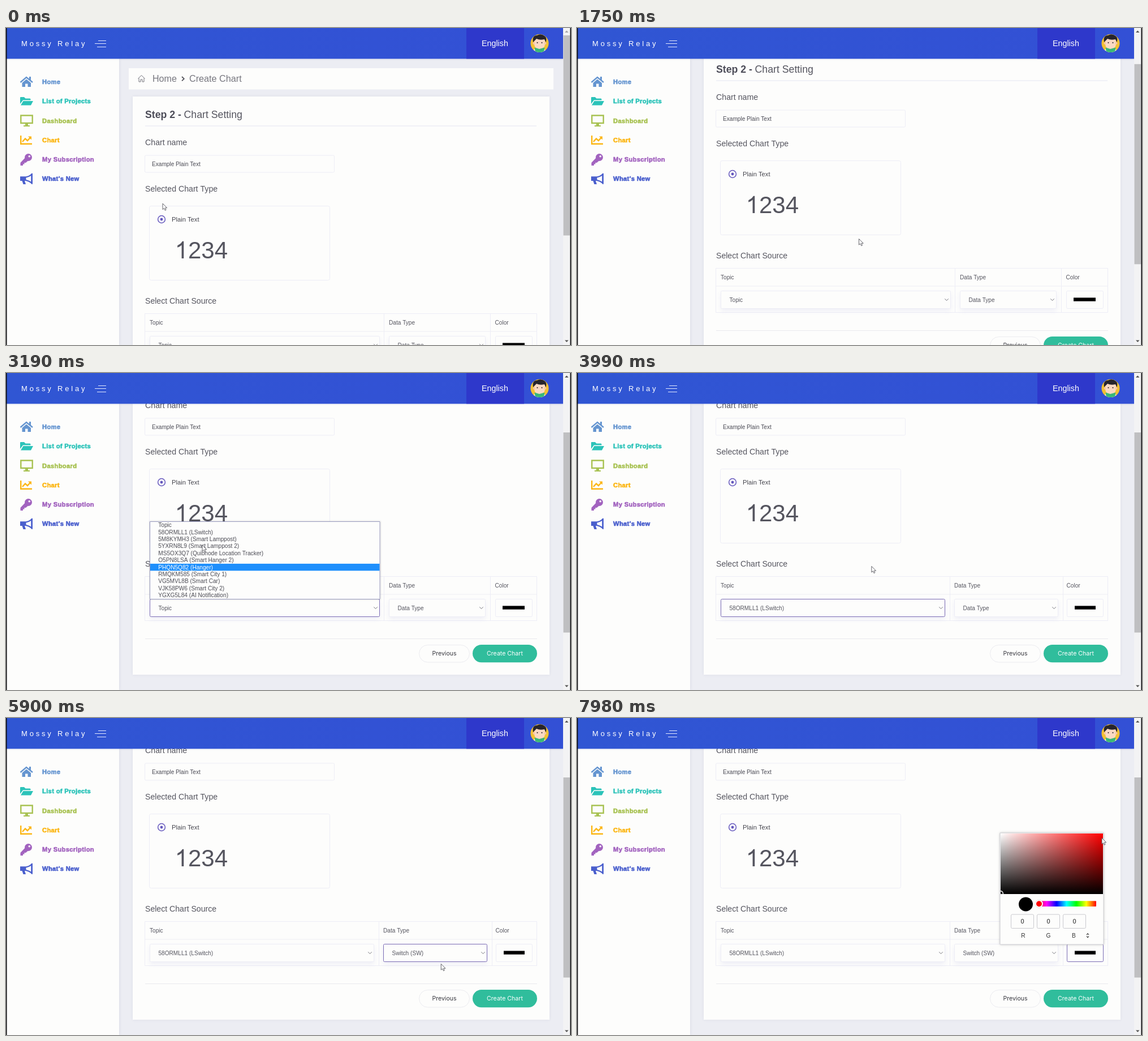
An HTML page with a canvas for the animation above (8000 ms loop, 999x560 px).

```html
<!DOCTYPE html>
<html lang="en">
<head>
<meta charset="utf-8">
<title>Chart setting</title>
<style>
html, body { margin: 0; width: 999px; height: 560px; overflow: hidden; background: #ecedf3; }
canvas { display: block; }
</style>
</head>
<body>
<canvas id="stage" width="999" height="560"></canvas>
<script>
const ctx = document.getElementById('stage').getContext('2d');
const LOOP = 8000, STEP = 159.6, SCROLL = 145;
const SANS = '"Liberation Sans", Arial, sans-serif';
const ROUND = 'Inter, "Open Sans", sans-serif';
const INK = '#55555f', LINE = '#ededf6', WHITE = '#fdfdfc', FOCUS = '#7a6bb5';

// Moments when the page reacts
const TOPIC_OPEN = 2700, TOPIC_SET = 3500, TYPE_OPEN = 4620, TYPE_SET = 5560,
      COLOR_FOCUS = 6690, PANEL = 6840, PICKER = 7000;

const TOPICS = ['Topic', '58ORMLL1 (LSwitch)', '5M8KYMH3 (Smart Lamppost)', '5YXRN8L9 (Smart Lamppost 2)',
  'MS5OX3Q7 (Quibnode Location Tracker)', 'O5PN8LSA (Smart Hanger 2)', 'PHQN5Q82 (Hanger)',
  'RMQKM585 (Smart City 1)', 'VG5MVL8B (Smart Car)', 'VJK58PW6 (Smart City 2)', 'YGXG5L84 (AI Notification)'];
const TYPES = ['Data Type', 'Switch (SW)'];

// time, x, y of the pointer tip
const PATH = [
  [0, 277, 310], [160, 277, 310], [1120, 498.5, 372.5], [2150, 498.5, 372.5], [2620, 385, 413], [2780, 372, 412],
  [3032, 350, 343], [3192, 347, 304], [3352, 344, 282], [3560, 344, 281], [4480, 736, 415],
  [5000, 736, 415], [5270, 712, 447], [5580, 712, 448], [6400, 877, 409], [6900, 877, 409], [7800, 928, 212]
];

const clamp = v => Math.max(0, Math.min(1, v));
const smooth = v => { v = clamp(v); return v * v * (3 - 2 * v); };

function pointer(t) {
  let i = 0;
  while (i < PATH.length - 2 && t >= PATH[i + 1][0]) i++;
  const [t0, x0, y0] = PATH[i], [t1, x1, y1] = PATH[i + 1];
  const k = t1 - t0 > 400 ? smooth((t - t0) / (t1 - t0)) : clamp((t - t0) / (t1 - t0));
  return [x0 + (x1 - x0) * k, y0 + (y1 - y0) * k];
}

function text(s, x, mid, size, color = INK, { weight = '', family = SANS, align = 'left', gap = 0 } = {}) {
  ctx.font = `${weight} ${size}px ${family}`;
  ctx.textAlign = align;
  ctx.letterSpacing = gap + 'px';
  ctx.fillStyle = color;
  ctx.fillText(s, x, mid + size * 0.36);
  ctx.letterSpacing = '0px';
}

function rect(x, y, w, h, color) {
  ctx.fillStyle = color;
  ctx.fillRect(x, y, w, h);
}

// A stroked box keeps its outline inside the given bounds
function box(x, y, w, h, r, fill, stroke, shadow) {
  const inset = stroke ? 0.5 : 0;
  ctx.save();
  ctx.beginPath();
  ctx.roundRect(x + inset, y + inset, w - 2 * inset, h - 2 * inset, r);
  if (shadow) {
    ctx.shadowColor = shadow;
    ctx.shadowBlur = 8;
    ctx.shadowOffsetY = 4;
  }
  if (fill) { ctx.fillStyle = fill; ctx.fill(); }
  ctx.shadowColor = 'transparent';
  if (stroke) { ctx.strokeStyle = stroke; ctx.lineWidth = 1; ctx.stroke(); }
  ctx.restore();
}

function circle(x, y, r, fill, stroke, width = 1) {
  ctx.beginPath();
  ctx.arc(x, y, r, 0, 7);
  if (fill) { ctx.fillStyle = fill; ctx.fill(); }
  if (stroke) { ctx.strokeStyle = stroke; ctx.lineWidth = width; ctx.stroke(); }
}

function shape(d, fill, stroke, width = 1) {
  const p = new Path2D(d);
  if (fill) { ctx.fillStyle = fill; ctx.fill(p); }
  if (stroke) { ctx.strokeStyle = stroke; ctx.lineWidth = width; ctx.stroke(p); }
}

function header() {
  ctx.save();
  ctx.shadowColor = 'rgba(50,60,130,.18)';
  ctx.shadowBlur = 4;
  const g = ctx.createLinearGradient(0, 0, 985, 0);
  g.addColorStop(0, '#3056d3');
  g.addColorStop(1, '#3350d5');
  rect(0, 0, 985, 54.4, g);
  ctx.restore();
  rect(814, 0, 102, 54.4, '#2e38cb');
  text('Mossy Relay', 27, 27.5, 13, '#fff', { gap: 3.8 });
  shape('M163 22.5H177M157 27.5H177M161 33.5H177', null, '#e3e9ff', 1.2);
  text('English', 841, 27, 14.3, '#fff');
  avatar();
}

function avatar() {
  ctx.save();
  ctx.beginPath();
  ctx.arc(943.5, 27, 16, 0, 7);
  ctx.clip();
  rect(927, 10, 33, 34, '#f3c132');
  shape('M931 44Q932 35 943 35Q954 35 956 44Z', '#f7f3e8');
  shape('M934 19H953V29Q952 37 943.5 37Q935 37 934 29Z', '#fbd9c3');
  shape('M934.5 34.5L943 37L952.5 34.5L951 43H936Z', '#38b878');
  circle(933.5, 27, 2, '#f6c6ac');
  circle(953.5, 27, 2, '#f6c6ac');
  shape('M932 25Q930 13 939 13Q946 9 952 14Q957 17 954.5 25L952 20Q944 22 938 19Z', '#26242b');
  circle(939.5, 26, 1.1, '#33292b');
  circle(947.5, 26, 1.1, '#33292b');
  ctx.restore();
}

function sidebar() {
  ctx.save();
  ctx.shadowColor = 'rgba(90,95,130,.16)';
  ctx.shadowBlur = 5;
  rect(0, 54, 200, 506, WHITE);
  ctx.restore();
  const items = [['Home', '#6595d0'], ['List of Projects', '#2cc3b9'], ['Dashboard', '#a8c252'],
    ['Chart', '#fcb614'], ['My Subscription', '#a263bf'], ["What's New", '#4a5fcd']];
  items.forEach(([label, color], i) => {
    const y = 95 + i * 34.25;
    text(label, 64, y, 11.2, color, { weight: 'bold', gap: 0.33 });
    ctx.strokeStyle = color;
    ctx.lineWidth = 0.6;
    ctx.letterSpacing = '0.33px';
    ctx.strokeText(label, 64, y + 11.2 * 0.36);
    ctx.letterSpacing = '0px';
  });
  const [home, folder, screen, chart, key, horn] = items.map(i => i[1]);
  shape('M25.5 96L36 87L47 96', null, home, 2.4);
  shape('M41 86H44V92H41ZM28.5 97L36 90.5L44 97V104H38.5V98.5H34V104H28.5Z', home);
  shape('M25 123Q25 122 26 122H32L34.5 124.5H42Q43.5 124.5 43.5 126V127.5H30L25 134Z', folder);
  shape('M30.5 129H48L44 136.5H26Z', folder);
  shape('M26.3 154.5H46.7V168H26.3Z', null, screen, 2.4);
  shape('M34 168H39V172H42V174H31V172H34Z', screen);
  shape('M26.2 190V204.8H46', null, chart, 2.4);
  shape('M29 201L34 195.5L38 199L43 193.5', null, chart, 2.4);
  shape('M39 191.5H45V197.5Z', chart);
  circle(39.5, 228.5, 6.5, key);
  shape('M34 229L39 234.5L35 238H32.5V240.5H30V243H25.5V238Z', key);
  circle(41.3, 226.7, 1.8, WHITE);
  shape('M26 263.5H35Q41 262.5 45.5 258.5V274Q41 270 35 269H26Z', null, horn, 2);
  shape('M25 262.5H35.5V270H33L35 276H30.5L28.5 270H25ZM44.5 257H47V275.5H44.5Z', horn);
}

function chevron(x, y) {
  shape(`M${x - 3.2} ${y - 1.7}L${x} ${y + 1.6}L${x + 3.2} ${y - 1.7}`, null, '#77777f', 1);
}

function select(x, right, y, label, focused) {
  box(x, y, right - x, 32, 2, WHITE, focused ? FOCUS : LINE, 'rgba(90,90,190,.09)');
  text(label, x + 15.5, y + 16, 10.1);
  chevron(right - 7.5, y + 16);
}

function content(t, shift) {
  ctx.save();
  ctx.translate(0, -shift);
  rect(217, 71, 751, 37.5, WHITE);
  shape('M233.5 89.5L239.5 83.5L245.5 89.5M235 88.5V95H238V91H241V95H244V88.5', null, '#76767e', 1);
  text('Home', 259, 89.5, 16.1, '#77777f');
  shape('M311 86L314.8 89.7L311 93.4', null, '#55555c', 1.8);
  text('Create Chart', 324, 89.5, 16.2, '#77777f');

  ctx.save();
  ctx.shadowColor = 'rgba(80,85,130,.1)';
  ctx.shadowBlur = 5;
  rect(224, 121, 737, 557, WHITE);
  ctx.restore();
  text('Step 2 -', 246, 152.5, 17.7, '#4c4c58', { weight: 'bold' });
  text('Chart Setting', 314.6, 152.5, 17.7);
  rect(246, 172.5, 692, 1, '#e3e5f3');
  text('Chart name', 246, 202, 14.2);
  box(245, 224.5, 336, 31, 2, WHITE, LINE);
  text('Example Plain Text', 258, 240, 10.1, '#4a4a54');
  text('Selected Chart Type', 246, 284, 14.15);
  box(253, 314, 320, 132, 3, WHITE, LINE);
  circle(275, 338, 6.4, null, '#6558bd', 1.5);
  circle(275, 338, 2.4, '#6558bd');
  text('Plain Text', 293, 337.5, 11.2, '#45454e');
  bigNumber(298.6, 407, 42);
  text('Select Chart Source', 246, 482, 14.1);
  table(t);

  rect(246, 614, 693, 1, '#e9e9ed');
  box(730, 625, 90, 31.5, 15.5, WHITE, '#ececf0');
  text('Previous', 775, 640.3, 10.5, '#34343c', { family: ROUND, align: 'center' });
  box(825, 625, 114, 31.2, 15.6, '#30bd9c');
  text('Create Chart', 882, 640.3, 10.6, '#fff', { family: ROUND, align: 'center' });
  ctx.restore();
}

// The leading digit is a plain stem with a flag and no foot
function bigNumber(x, y, s) {
  ctx.save();
  ctx.translate(x, y);
  ctx.scale(s, -s);
  shape('M.3726 0H.2847V.56Q.22 .495 .109 .457V.543Q.255 .61 .316 .7188H.3726Z', INK);
  ctx.restore();
  ctx.font = `${s}px ${SANS}`;
  ctx.textAlign = 'left';
  ctx.fillStyle = INK;
  ctx.fillText('234', x + s * 0.556, y);
}

function table(t) {
  const set = t >= TOPIC_SET;
  const colType = set ? 659 : 668, colColor = set ? 859 : 856;
  const typeX = set ? 667 : 677, colorX = set ? 866 : 865;
  box(245, 504, 694, 79, 0, null, LINE);
  rect(246, 535.5, 693, 1, LINE);
  rect(colType, 505, 1, 78, LINE);
  rect(colColor, 505, 1, 78, LINE);
  text('Topic', 254, 520, 10.1);
  text('Data Type', typeX, 520, 10.1);
  text('Color', colorX - 0.5, 520, 10.1);
  select(254, set ? 651 : 661, 544, set ? TOPICS[1] : TOPICS[0], t >= TOPIC_OPEN && t < TYPE_OPEN);
  select(typeX, set ? 851 : 848, 544, t >= TYPE_SET ? TYPES[1] : TYPES[0], t >= TYPE_OPEN && t < COLOR_FOCUS);
  box(colorX, 544, 931 - colorX, 32, 2, WHITE, t >= COLOR_FOCUS ? FOCUS : LINE);
  rect(set ? 880 : 878, 556.4, set ? 37 : 39, 6.3, '#000');
}

function list(items, x, y, w, h, hoverY) {
  const row = 12.4;
  const hit = Math.floor((hoverY - y - 0.5) / row);
  const on = hit >= 0 && hit < items.length ? hit : 0;
  ctx.save();
  ctx.shadowColor = 'rgba(0,0,0,.2)';
  ctx.shadowBlur = 3;
  rect(x, y, w, h, WHITE);
  ctx.restore();
  box(x, y, w, h, 0, null, '#9a9cc0');
  rect(x + 1, y + on * row + 0.5, w - 2, row, '#1e8ffc');
  items.forEach((s, i) => text(s, x + 15.2, y + 6.5 + i * row, 10.15, i === on ? '#fff' : '#4c4c55'));
}

function panel(t) {
  if (t < PICKER) {
    // only the frame has appeared, the page still shows inside it
    box(747, 202, 184.5, 198, 1, null, '#dadae0');
    box(746, 201, 186.5, 200, 2, null, '#ededf1');
    return;
  }
  ctx.save();
  ctx.shadowColor = 'rgba(0,0,0,.28)';
  ctx.shadowBlur = 4;
  rect(748, 203, 183, 197, WHITE);
  ctx.restore();
  box(747.5, 202.5, 184, 198, 0, null, '#cfcfd4');
  let g = ctx.createLinearGradient(749, 0, 930, 0);
  g.addColorStop(0, '#fff');
  g.addColorStop(1, '#f00');
  rect(749, 204, 181, 107, g);
  g = ctx.createLinearGradient(0, 204, 0, 311);
  g.addColorStop(0, 'rgba(0,0,0,0)');
  g.addColorStop(1, '#000');
  rect(749, 204, 181, 107, g);
  ctx.save();
  ctx.beginPath();
  ctx.rect(749, 204, 181, 107);
  ctx.clip();
  circle(749, 310, 4.3, '#000', '#fff', 1.5);
  ctx.restore();
  circle(793.5, 329, 12.5, '#000');
  g = ctx.createLinearGradient(813, 0, 918, 0);
  ['#f00', '#f0f', '#00f', '#0ff', '#0f0', '#ff0', '#f00'].forEach((c, i) => g.addColorStop(i / 6, c));
  box(812, 323.3, 106, 9.6, 1, g);
  circle(817, 328.3, 6, '#f00', '#fff', 2);
  circle(817, 328.3, 7, null, 'rgba(0,0,0,.18)', 0.6);
  [[767, 'R', 789], [813, 'G', 833.5], [859, 'B', 878.5]].forEach(([x, name, mid]) => {
    box(x, 346.5, 41, 25.5, 2, WHITE, '#c9c9ce');
    text('0', x + 20.5, 359, 11, '#222', { align: 'center' });
    text(name, mid, 384, 10.2, '#333', { align: 'center' });
  });
  shape('M901 383L903 380.8L905 383M901 385.5L903 387.7L905 385.5', null, '#222', 1.1);
}

function scrollbar(shift) {
  rect(985, 0, 13, 560, '#f3f3f4');
  rect(985.5, 13 + shift * 92 / SCROLL, 12, 353.5, '#bfbfc1');
  shape('M988 8L991.3 4.5L994.6 8Z', shift ? '#555' : '#a5a5a8');
  shape('M988 551.5L991.3 555L994.6 551.5Z', '#555');
  rect(0, 0, 1.5, 560, '#0a0a0c');
  rect(997.5, 0, 1.5, 560, '#0a0a0c');
}

function cursor(x, y) {
  ctx.save();
  ctx.translate(x, y);
  ctx.lineJoin = 'round';
  shape('M0 0V10.6L2.5 8.4L4.2 12.2L6 11.4L4.4 7.8H7.7Z', '#fff', '#55555c', 0.9);
  ctx.restore();
}

function draw(time) {
  // the picture advances in even steps, like a screen recording
  const t = Math.floor((time % LOOP) / STEP + 0.06) * STEP;
  const shift = Math.round(SCROLL * smooth((t - 1500) / 480));
  const [x, y] = pointer(t);
  const hoverY = pointer(Math.max(0, t - STEP))[1];
  rect(0, 0, 999, 560, '#ecedf3');
  content(t, shift);
  sidebar();
  header();
  scrollbar(shift);
  if (t >= TOPIC_OPEN && t < TOPIC_SET) list(TOPICS, 254, 262, 407.5, 138, hoverY);
  if (t >= TYPE_OPEN && t < TYPE_SET) list(TYPES, 666.5, 430, 184.5, 27, hoverY);
  if (t >= PANEL) panel(t);
  cursor(x, y);
}

const start = performance.now();
function tick() {
  draw(performance.now() - start);
  requestAnimationFrame(tick);
}
tick();
</script>
</body>
</html>
```
